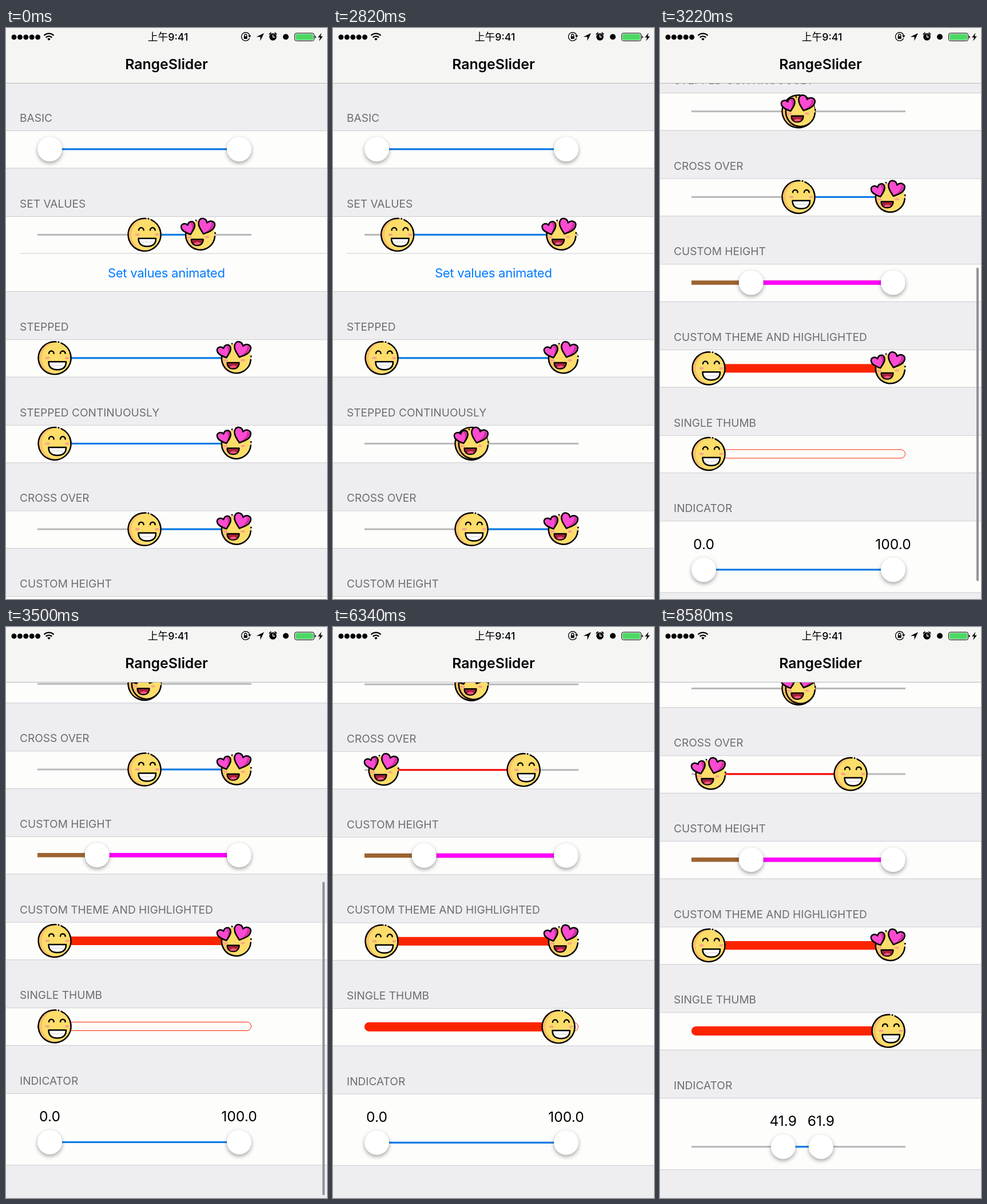
These frames come from a looping animation (561x998 px, 8.6 s). An HTML page:

```html
<!DOCTYPE html>
<html lang="en">
<head>
<meta charset="utf-8">
<title>RangeSlider</title>
<style>
  html, body { margin: 0; width: 100%; height: 100%; overflow: hidden; background: #eeeef0; }
  svg { display: block; }
  text { font-family: Inter, "Noto Sans CJK SC", "Noto Sans CJK", sans-serif; }
  .head { font-size: 19.1px; fill: #6d6d72; }
  .value { font-size: 24.6px; text-anchor: middle; }
  .knob { filter: drop-shadow(0 3.5px 3.5px rgba(0, 0, 0, .36)); }
  .ink { fill: none; stroke: #000; stroke-width: 2.5; stroke-linecap: round; stroke-linejoin: round; }
</style>
</head>
<body>
<svg width="561" height="998" viewBox="0 0 561 998">
  <defs>
    <g id="knob"><circle class="knob" r="21.5" fill="#fff"/></g>
    <g id="smile">
      <circle r="28.5" fill="#fbc066"/>
      <path d="M6-27.5A27.8 27.8 0 0 1 6 27.5A27.52 27.52 0 1 1 6-27.5" fill="#fddd6a"/>
      <path class="ink" d="M11.5-26.1A28.5 28.5 0 1 1 2.5-28.4"/>
      <circle cx="7" cy="-28" r="1.5"/>
      <path class="ink" d="M-10-8a4.3 4.3 0 0 1 8.6 0M10-8a4.3 4.3 0 0 1 8.6 0"/>
      <ellipse cx="-12.5" cy="0" rx="4" ry="2.2" fill="#f9a58c"/>
      <ellipse cx="22" cy="0" rx="3.6" ry="2.2" fill="#f9a58c"/>
      <path class="ink" d="M-10.5 6.5H20C20 16 14.5 20.5 4.7 20.5S-10.5 16-10.5 6.5Z" style="fill:#fff"/>
      <path d="M-6 13H15.5" stroke="#d8d8dc" stroke-width="1.2"/>
    </g>
    <path id="heart" d="M0 11C-5 7-12 2-12-4C-12-12-3-12 0-6C3-12 12-12 12-4C12 2 5 7 0 11Z"/>
    <g id="love">
      <circle cx="3.5" cy="1" r="25.5" fill="#fbc066"/>
      <path d="M9-23.9A25.5 25.5 0 0 1 9 25.9A24.92 24.92 0 1 1 9-23.9" fill="#fddd6a"/>
      <path class="ink" d="M28.8 3A25.5 25.5 0 1 1 -20.5-8"/>
      <circle cx="29.3" cy="-3" r="1.5"/>
      <circle cx="-4" cy="-25" r="1.4"/>
      <ellipse cx="-15" cy="4" rx="3.5" ry="2" fill="#f9a58c"/>
      <ellipse cx="15" cy="4" rx="3.8" ry="2" fill="#f9a58c"/>
      <path class="ink" d="M-12.5 8H8.5C8.5 14.5 4.5 18.7-2 18.7S-12.5 14.5-12.5 8Z" style="fill:#a5203c;stroke-width:2.3"/>
      <path d="M-8 16.4C-5 12 2 12 4.500 15.8C1 18.200-5 18.200-8 16.4" fill="#f4587c"/>
      <g transform="translate(-17 -11) rotate(-17)">
        <use href="#heart" fill="#fb4bd0"/>
        <path d="M6-9C14-7 11 3 0 10C6 3 8-2 6-9" fill="#cf2fa0"/>
        <use href="#heart" class="ink"/>
      </g>
      <g transform="translate(13 -14) rotate(18) scale(1.2)">
        <use href="#heart" fill="#fb4bd0"/>
        <path d="M6-9C14-7 11 3 0 10C6 3 8-2 6-9" fill="#cf2fa0"/>
        <use href="#heart" class="ink" style="stroke-width:2.1"/>
      </g>
    </g>
  </defs>

  <rect width="561" height="998" fill="#eeeef0"/>
  <g id="list"></g>
  <rect id="bar" x="553" width="4" height="548" rx="2" fill="#939396"/>

  <rect width="561" height="96" fill="#f5f5f4"/>
  <rect y="96" width="561" height="1" fill="#b8b8bd"/>
  <text x="280.5" y="72" font-size="24.8" font-weight="600" text-anchor="middle">RangeSlider</text>
  <text x="283" y="22" font-size="17.8" font-weight="500" text-anchor="middle">上午9:41</text>
  <path d="M14 16h42" stroke="#000" stroke-width="9" stroke-linecap="round" stroke-dasharray="0 10.4"/>
  <g fill="none" stroke="#000" stroke-width="2.4">
    <path d="M66.5 13.2a12 12 0 0 1 17 0M69.7 16.6a7.5 7.5 0 0 1 10.6 0"/>
    <path d="M75 22l-2.8-3a4 4 0 0 1 5.6 0z" fill="#000" stroke="none"/>
  </g>
  <g fill="none" stroke="#000" stroke-width="1.3">
    <path d="M425.5 18a7.3 7.3 0 1 1 .3-5"/>
    <path d="M423 13h5.5l-2.7 4z" fill="#000" stroke="none"/>
    <path d="M416.7 15v-2a2 2 0 0 1 4 0v2"/>
    <rect x="415.7" y="14.5" width="6" height="4.5" fill="#000" stroke="none"/>
  </g>
  <path d="M451 9L444.5 22.5V15.5H437.5Z"/>
  <circle cx="466.5" cy="15.5" r="6.3"/>
  <path d="M460.3 10.8l2.6-2.3M472.7 10.8l-2.6-2.3" stroke="#000" stroke-width="1.8" stroke-linecap="round"/>
  <path d="M466.5 11.5v4.5h3.5" fill="none" stroke="#f5f5f4" stroke-width="1.3"/>
  <circle cx="489" cy="15.5" r="5"/>
  <rect x="504.5" y="9" width="34" height="13.5" rx="3" fill="none" stroke="#000"/>
  <rect x="506" y="10.5" width="31" height="10.5" rx="1.8" fill="#4cd964"/>
  <path d="M539.8 13.5v4.5q2-.5 2-2.25t-2-2.25z"/>
  <path d="M551.5 8.5L545 16.5h4L547 23l6.8-8.5h-4z"/>
</svg>
<script>
const LOOP = 8600, STEP = 20;
const LEFT = 55, RIGHT = 429, BLUE = '#007aff', GRAY = '#b7b7b9';
const list = document.getElementById('list'), bar = document.getElementById('bar');

function add(tag, attrs, text) {
  const el = document.createElementNS('http://www.w3.org/2000/svg', tag);
  for (const k in attrs) el.setAttribute(k, attrs[k]);
  if (text) el.textContent = text;
  return list.appendChild(el);
}
const line = (y, x = 0) => add('rect', { x, y, width: 561 - x, height: 1, fill: '#cccbd0' });

function section(title, mid, height = 65.5) {
  const top = mid + 22;
  add('text', { x: 24, y: mid + 7, class: 'head' }, title);
  add('rect', { y: top, width: 561, height, fill: '#fdfdfc' });
  line(top);
  line(top + height);
}

// Returns a setter that places the thumbs by their values from 0 to 1.
function slider(y, kinds, { color = '#047ae8', base = GRAY, size = 3, labels } = {}) {
  const single = kinds.length === 1;
  const half = kinds[0] === 'knob' ? 21.5 : 30;
  const box = { x: LEFT, y: y - size / 2, width: RIGHT - LEFT, height: size };
  if (single) add('rect', { ...box, x: LEFT + .5, width: box.width - 1, rx: size / 2, fill: 'none', stroke: color });
  else add('rect', { ...box, fill: base });
  const fill = add('rect', { ...box, fill: color, rx: single ? size / 2 : 0 });
  const thumbs = kinds.map(k => add('use', { href: '#' + k }));
  const texts = labels ? kinds.map(() => add('text', { y: y - 36, class: 'value' }, '0.0')) : [];
  return (...values) => {
    const xs = values.map(v => LEFT + half + v * (RIGHT - LEFT - 2 * half));
    const from = single ? LEFT : Math.min(...xs);
    fill.setAttribute('x', from);
    fill.setAttribute('width', Math.max(...xs) - from);
    fill.setAttribute('fill', values[0] > values[1] ? '#f00' : color);
    thumbs.forEach((el, i) => el.setAttribute('transform', `translate(${xs[i]} ${y})`));
    texts.forEach((el, i) => {
      el.setAttribute('x', xs[i]);
      el.textContent = (values[i] * 100).toFixed(1);
    });
  };
}

const faces = ['smile', 'love'], knobs = ['knob', 'knob'];
const red = { color: '#fb2400', base: '#fdfdfc', size: 15 };

section('BASIC', 157);
const basic = slider(211.8, knobs);
section('SET VALUES', 307, 131);
line(393.5, 24);
add('text', { x: 280.3, y: 435.5, 'font-size': 22, 'letter-spacing': -.25, fill: BLUE, 'text-anchor': 'middle' },
  'Set values animated');
const animated = slider(361.3, faces);
section('STEPPED', 522.2);
const stepped = slider(576.8, faces);
section('STEPPED CONTINUOUSLY', 671.8);
const hopping = slider(726.4, faces);
section('CROSS OVER', 821.4);
const crossing = slider(876, faces);
section('CUSTOM HEIGHT', 971);
const thick = slider(1025.7, knobs, { color: '#f0f', base: '#9c6430', size: 7.5 });
section('CUSTOM THEME AND HIGHLIGHTED', 1120.7);
const themed = slider(1175.5, faces, red);
section('SINGLE THUMB', 1270.3);
const single = slider(1325, ['smile'], red);
section('INDICATOR', 1420, 125);
const indicator = slider(1527.4, knobs, { labels: true });

const unit = (t, a, b) => Math.min(1, Math.max(0, (t - a) / (b - a)));
function move(t, a, b, from, to) {
  const u = unit(t, a, b);
  return from + (to - from) * u * u * (3 - 2 * u);
}
const hop = v => Math.round(v * 10) / 10;
const flash = (t, a, b) => unit(t, a, a + 50) * (1 - unit(t, b, b + 180));

basic(0, 1);
stepped(0, 1);
thick(.25, 1);
themed(0, 1);

function draw(t) {
  animated(move(t, 200, 800, .5, .088), move(t, 200, 800, .8, .989));
  hopping(hop(move(t, 1700, 2140, 0, .5)), hop(move(t, 2200, 2600, 1, .5)));
  crossing(move(t, 4640, 5260, .5, .79), move(t, 3800, 4560, 1, 0));
  single(move(t, 5600, 6400, 0, 1));
  indicator(move(t, 6958, 7400, 0, .419), move(t, 7480, 8260, 1, .619));

  const flick = 627 * (1 - (1 - unit(t, 2920, 3437)) ** 3);
  const scroll = flick - move(t, 3760, 3960, 0, .8) - move(t, 6480, 6720, 0, 7.2);
  list.setAttribute('transform', `translate(0 ${-scroll})`);
  bar.setAttribute('y', 419 + (scroll - 581) * .57);
  bar.setAttribute('opacity', flash(t, 2920, 3580) + flash(t, 6480, 6780));
}

// The picture advances in fixed steps, like a screen recording.
const start = performance.now();
function tick() {
  const t = (performance.now() - start) % LOOP;
  draw(Math.floor(t / STEP) * STEP);
  requestAnimationFrame(tick);
}
tick();
</script>
</body>
</html>
```
